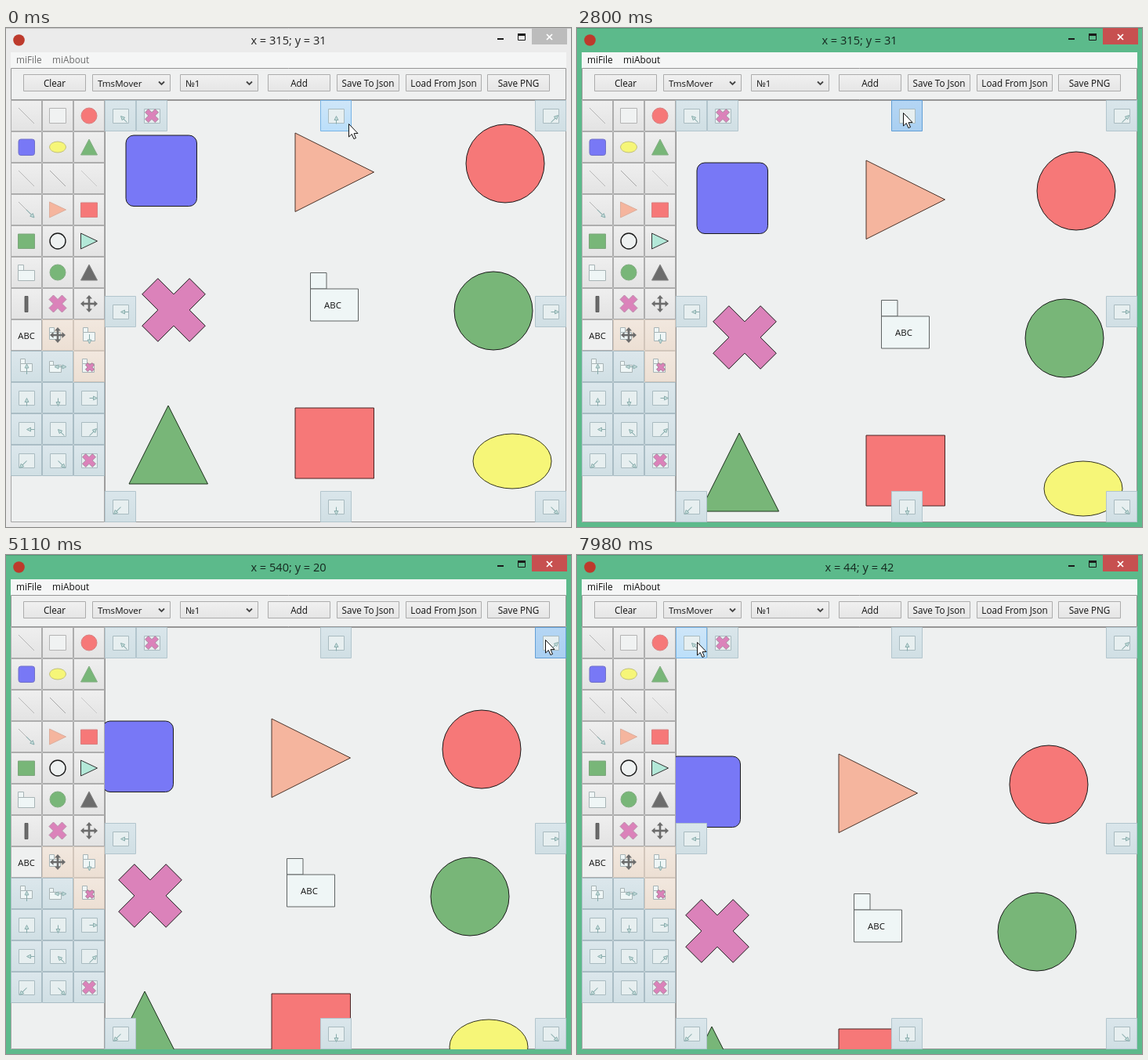
An HTML page with a canvas for the animation above (8000 ms loop, 721 by 637 pixels).

```html
<!DOCTYPE html>
<html lang="en">
<head>
<meta charset="utf-8">
<title>Shape editor</title>
<style>
  html, body { margin: 0; width: 100%; height: 100%; overflow: hidden; }
  canvas { display: block; width: 721px; height: 637px; }
</style>
</head>
<body>
<canvas width="721" height="637"></canvas>
<script>
const ctx = document.querySelector('canvas').getContext('2d');
const LOOP = 8000, TICK = 70, STEP = 5;
const FONT = '"Open Sans", "Noto Sans", sans-serif';
const C = {
  red: '#f67878', blue: '#7878f6', green: '#78b678', yellow: '#f6f678',
  orange: '#f5b59e', pink: '#db82ba', paper: '#eff6f6', mint: '#b3e8d8',
  bg: '#eef0f0', ink: '#1a1a1a', dark: '#6c6c6c', teal: '#86aaaa'
};

// [time, x, y] of the pointer tip
const PATH = [
  [70, 437, 122], [350, 411, 103], [560, 411, 103], [910, 416, 108],
  [3290, 416, 108], [3430, 500, 126], [3570, 666, 113], [3640, 709, 112],
  [3780, 709, 112], [3920, 702, 112], [4060, 702, 112], [4270, 688, 108],
  [6020, 688, 108], [6300, 588, 312], [6440, 530, 348], [6860, 174, 136],
  [6930, 170, 135], [7000, 153, 110], [7070, 153, 110], [7210, 153, 111]
];

// Each scroll pad: shift per click, highlight span, click and press times
const UP = {
  dx: 0, dy: STEP, hot: [0, 4270],
  clicks: [1330, 1750, 2030, 2450, 2450, 2590, 2730, 3080, 3220],
  press: [[1190, 1330], [1680, 1750], [2030, 2170], [2310, 2590], [2800, 3080], [3150, 3220]]
};
const UP_RIGHT = {
  dx: -STEP, dy: STEP, hot: [3640, 7420],
  clicks: [4410, 4480, 4760, 4900, 4970, 5040, 5180, 5320, 5670, 5670, 5880],
  press: [[4270, 4410], [4480, 4760], [4830, 4900], [4970, 5040], [5110, 5180],
          [5250, 5320], [5390, 5810], [5880, 5950]]
};
const UP_LEFT = {
  dx: STEP, dy: STEP, hot: [7000, LOOP],
  clicks: [7490, 7630, 7840, 7840],
  press: [[7420, 7490], [7560, 7630], [7700, 7980]]
};
const PADS = [
  [126, 92, 'ul', UP_LEFT], [166, 92, 'x'], [401, 92, 'u', UP], [675, 92, 'ur', UP_RIGHT],
  [126, 342, 'l'], [675, 342, 'r'], [126, 591, 'dl'], [401, 591, 'd'], [675, 591, 'dr']
];

const within = (t, [a, b]) => t >= a && t < b;

function pointer(t) {
  const i = PATH.findIndex(p => p[0] >= t);
  if (i < 0) return PATH[PATH.length - 1].slice(1);
  if (i === 0) return PATH[0].slice(1);
  const [t0, x0, y0] = PATH[i - 1], [t1, x1, y1] = PATH[i];
  const k = (t - t0) / (t1 - t0);
  return [Math.round(x0 + (x1 - x0) * k), Math.round(y0 + (y1 - y0) * k)];
}

// The caption keeps the last pointer position over the free canvas
function caption(t) {
  for (; t >= 0; t -= TICK) {
    const [x, y] = pointer(t);
    const onPad = PADS.some(([px, py]) => x >= px && x < px + 40 && y >= py && y < py + 40);
    if (!onPad) return `x = ${x - 126}; y = ${y - 93}`;
  }
  return 'x = 315; y = 31';
}

function paint(fill, stroke, width = 1) {
  if (fill) { ctx.fillStyle = fill; ctx.fill(); }
  if (stroke) { ctx.strokeStyle = stroke; ctx.lineWidth = width; ctx.stroke(); }
}
function rect(x, y, w, h, fill, stroke, width) {
  ctx.beginPath(); ctx.rect(x, y, w, h); paint(fill, stroke, width);
}
function round(x, y, w, h, r, fill, stroke) {
  ctx.beginPath(); ctx.roundRect(x, y, w, h, r); paint(fill, stroke);
}
function oval(x, y, rx, ry, fill, stroke, width) {
  ctx.beginPath(); ctx.ellipse(x, y, rx, ry, 0, 0, 7); paint(fill, stroke, width);
}
function poly(pts, fill, stroke, width) {
  ctx.beginPath();
  pts.forEach(([x, y]) => ctx.lineTo(x, y));
  ctx.closePath();
  paint(fill, stroke, width);
}
function line(x0, y0, x1, y1, color, width = 1) {
  ctx.beginPath(); ctx.moveTo(x0, y0); ctx.lineTo(x1, y1); paint(null, color, width);
}
function text(s, x, y, size, color = '#111', align = 'center') {
  ctx.font = `${size}px ${FONT}`;
  ctx.textAlign = align;
  ctx.fillStyle = color;
  ctx.fillText(s, x, y);
}
function shade(y, h, top, bottom) {
  const g = ctx.createLinearGradient(0, y, 0, y + h);
  g.addColorStop(0, top);
  g.addColorStop(1, bottom);
  return g;
}
function cross(x, y, r, fill, stroke) {
  const h = r / 2;
  poly([[-h, -r], [0, -h], [h, -r], [r, -h], [h, 0], [r, h],
        [h, r], [0, h], [-h, r], [-r, h], [-h, 0], [-r, -h]]
    .map(([a, b]) => [x + a, y + b]), fill, stroke);
}
function arrow(x0, y0, x1, y1) {
  const a = Math.atan2(y1 - y0, x1 - x0);
  ctx.save();
  ctx.translate(x1, y1);
  ctx.rotate(a);
  line(-Math.hypot(x1 - x0, y1 - y0), 0, -5, 0, C.teal);
  poly([[0, 0], [-5, -2.5], [-5, 2.5]], '#c4dcda', C.teal, 0.9);
  ctx.restore();
}
function folder(x, y, w, h, tab, stroke, fill = C.paper) {
  rect(x, y, tab, tab, fill, stroke);
  rect(x, y + tab, w, h, fill, stroke);
}
function moveIcon(x, y, r) {
  for (let i = 0; i < 4; i++) {
    ctx.save();
    ctx.translate(x, y);
    ctx.rotate(i * Math.PI / 2);
    line(0, 0, r - 3, 0, C.dark, 2.6);
    poly([[r, 0], [r - 4.5, -4], [r - 4.5, 4]], C.dark);
    ctx.restore();
  }
}

// Arrow ends inside a 40 px cell
const ARROWS = {
  u: [20, 30, 20, 20], d: [20, 20, 20, 30], r: [20, 20, 30, 20], l: [30, 20, 20, 20],
  ul: [28, 28, 20, 20], ur: [20, 28, 29, 19], dl: [20, 20, 11, 29], dr: [20, 20, 29, 29]
};
function padIcon(kind) {
  rect(10.5, 11.5, 20, 18, '#e7eff0', '#a9bbc0');
  if (kind === 'x') cross(20, 20, 8.5, C.pink, '#a98aa0');
  else arrow(...ARROWS[kind].map(v => v + 0.5));
}

const slash = color => () => line(10, 10, 30, 30, color);
const tri = (fill, stroke) => () => poly([[20, 10], [9.5, 30], [30.5, 30]], fill, stroke);
const side = (fill, stroke) => () => poly([[9.5, 10], [30.5, 20], [9.5, 30]], fill, stroke);
const pad = kind => () => padIcon(kind);
const SOFT = '#a8b4b6';
const ICONS = [
  slash('#b4b4b4'), () => rect(9.5, 10.5, 21, 19, '#f0f2f2', '#b4b4b4'), () => oval(20, 20, 10, 10, C.red, '#d98080'),
  () => round(10, 10, 20.5, 20.5, 3, C.blue, '#7070c8'), () => oval(20, 20, 10.5, 7, C.yellow, '#c2c07c'), tri(C.green, '#83ad83'),
  slash('#b8b8b8'), slash('#a6a6a6'), slash('#c8c8c8'),
  () => { line(10, 10, 26, 26, '#b4b4b4'); arrow(20, 20, 30, 30); }, side(C.orange, '#dcae9d'), () => rect(9.5, 11, 21, 18.5, C.red, '#d98080'),
  () => rect(9.5, 11, 21, 18.5, C.green, '#7da67d'), () => oval(20, 20, 10, 10, '#eef1f1', C.ink, 1.4), side(C.mint, '#333'),
  () => folder(9.5, 10.5, 21, 13, 7, SOFT), () => oval(20, 20, 10, 10, C.green, '#83ad83'), tri(C.dark, '#808080'),
  () => rect(18, 10.5, 4, 20, C.dark, '#505050', 0.8), () => cross(20, 20, 11, C.pink, '#b98aa8'), () => moveIcon(20, 20, 11),
  () => text('ABC', 20, 25, 11.2), () => { folder(9.5, 10.5, 14, 9, 6, SOFT); moveIcon(20, 20, 10); },
  () => { folder(12.5, 10.5, 15, 11, 6, SOFT); arrow(20.5, 19, 20.5, 31); },
  () => { folder(12.5, 10.5, 15, 10, 6, SOFT); arrow(20.5, 30, 20.5, 17); },
  () => { folder(9.5, 13.5, 15, 9, 5, SOFT); arrow(21, 20.5, 31, 20.5); arrow(25, 20.5, 16, 20.5); },
  () => { folder(11.5, 10.5, 15, 11, 6, SOFT); cross(21, 21, 5.5, C.pink, '#a5788f'); },
  ...['u', 'd', 'r', 'l', 'ul', 'ur', 'dl', 'dr', 'x'].map(pad)
];

function cell(x, y, fill, border, icon) {
  rect(x + 0.5, y + 0.5, 39, 39, fill, border);
  ctx.save();
  ctx.translate(x, y);
  icon();
  ctx.restore();
}

function palette() {
  ICONS.forEach((icon, i) => {
    const x = 6 + 40 * (i % 3), y = 92 + 40 * Math.floor(i / 3);
    const beige = [22, 23, 26].includes(i), blue = i > 23 && !beige;
    const fill = i === 21 ? '#eff0f0'
      : beige ? shade(y, 40, '#f2e8df', '#ecdfd3')
      : blue ? shade(y, 40, '#dce7ec', '#d0dfe4')
      : shade(y, 40, '#efefef', '#e3e3e3');
    cell(x, y, fill, blue ? '#aabdc5' : beige ? '#d2c6bb' : '#adadad', icon);
  });
}

function drawPad([x, y, kind, ctl], t) {
  let fill = shade(y, 40, '#dae6eb', '#d0dfe4'), border = '#b2c5cd';
  if (ctl && within(t, ctl.hot)) {
    const down = ctl.press.some(p => within(t, p));
    fill = down ? shade(y, 40, '#b5d6f4', '#a9cff1') : shade(y, 40, '#cfe6f8', '#bbdffa');
    border = down ? '#629fd6' : '#78b4e6';
  }
  cell(x, y, fill, border, pad(kind));
}

function shapes(t) {
  let dx = 0, dy = 0;
  for (const p of [UP, UP_RIGHT, UP_LEFT]) {
    const n = p.clicks.filter(c => c <= t).length;
    dx += n * p.dx;
    dy += n * p.dy;
  }
  ctx.save();
  ctx.beginPath();
  ctx.rect(126, 93, 588, 538);
  ctx.clip();
  ctx.translate(dx + 0.5, dy + 0.5);
  round(152.5, 136.5, 90.5, 90.5, 10, C.blue, C.ink);
  poly([[368.5, 133.5], [469, 183.5], [368.5, 234]], C.orange, '#4b352c');
  oval(636.5, 172.5, 50, 50, C.red, C.ink);
  cross(213.5, 359.5, 40.3, C.pink, C.ink);
  folder(388, 312, 61, 41, 20.5, '#606464');
  text('ABC', 416.5, 357.5, 11.4);
  oval(621.5, 360.5, 50, 50, C.green, C.ink);
  poly([[206.5, 481.5], [156.5, 581.5], [257, 581.5]], C.green, '#1c301c');
  rect(368.5, 484.5, 100.5, 90, C.red, '#4a2424');
  oval(645.5, 552.5, 50, 35, C.yellow, '#35351c');
  ctx.restore();
}

function combo(label, x) {
  control('', x, 99);
  text(label, x + 7, 75, 11.6, '#111', 'left');
  ctx.beginPath();
  ctx.moveTo(x + 85, 68.5);
  ctx.lineTo(x + 88.5, 72);
  ctx.lineTo(x + 92, 68.5);
  paint(null, '#444', 1.8);
}
function control(label, x, w) {
  rect(x + 0.5, 59.5, w, 21, shade(59, 22, '#f1f1f1', '#e5e5e5'), '#acacac');
  text(label, x + w / 2 + 0.5, 75, 11.7);
}

function chrome(t) {
  const active = t >= 1190;
  rect(0, 0, 721, 637, active ? '#5cba8b' : '#ebebeb');
  line(0, 0.5, 721, 0.5, active ? '#4c9d75' : '#c4c4c4');
  oval(16.5, 15.5, 7.3, 7.3, '#bd3a2c');
  text(caption(t), 360.5, 21, 14.6, active ? '#14271e' : '#222');
  rect(627, 13, 8, 2, C.ink);
  rect(653.5, 8.5, 9, 7, null, C.ink);
  rect(653, 7, 10, 3, C.ink);
  rect(671, 0, 45, 21, active ? '#c75050' : '#bcbcbc');
  line(690, 8, 697, 15, '#fff', 1.7);
  line(697, 8, 690, 15, '#fff', 1.7);

  rect(6, 31, 709, 600, C.bg);
  rect(6, 31, 709, 20, '#f5f6f6');
  const menu = active ? '#111' : '#6d6d6d';
  text('miFile', 13, 45, 11.8, menu, 'left');
  text('miAbout', 59, 45, 11.8, menu, 'left');

  rect(6.5, 51.5, 708, 40, '#eff0f0', '#969696');
  control('Clear', 22, 79);
  combo('TmsMover', 110);
  combo('№1', 222);
  control('Add', 334, 79);
  control('Save To Json', 422, 79);
  control('Load From Json', 510, 96);
  control('Save PNG', 614, 79);

  rect(6.5, 92.5, 119, 538, null, '#a4a4a4');
  rect(126.5, 92.5, 588, 538, C.bg, '#969696');
}

function drawPointer(t) {
  const [x, y] = pointer(t);
  poly([[0, 0], [0, 16.5], [3.8, 13], [6.4, 19], [9, 18], [6.5, 12.2], [11.5, 12]]
    .map(([a, b]) => [x + a + 0.5, y + b + 0.5]), '#fff', '#111');
}

function draw(now) {
  const t = Math.floor((now % LOOP) / TICK) * TICK;
  chrome(t);
  palette();
  shapes(t);
  PADS.forEach(p => drawPad(p, t));
  drawPointer(t);
}

const start = performance.now();
function frame() {
  draw(performance.now() - start);
  requestAnimationFrame(frame);
}
frame();
</script>
</body>
</html>
```
